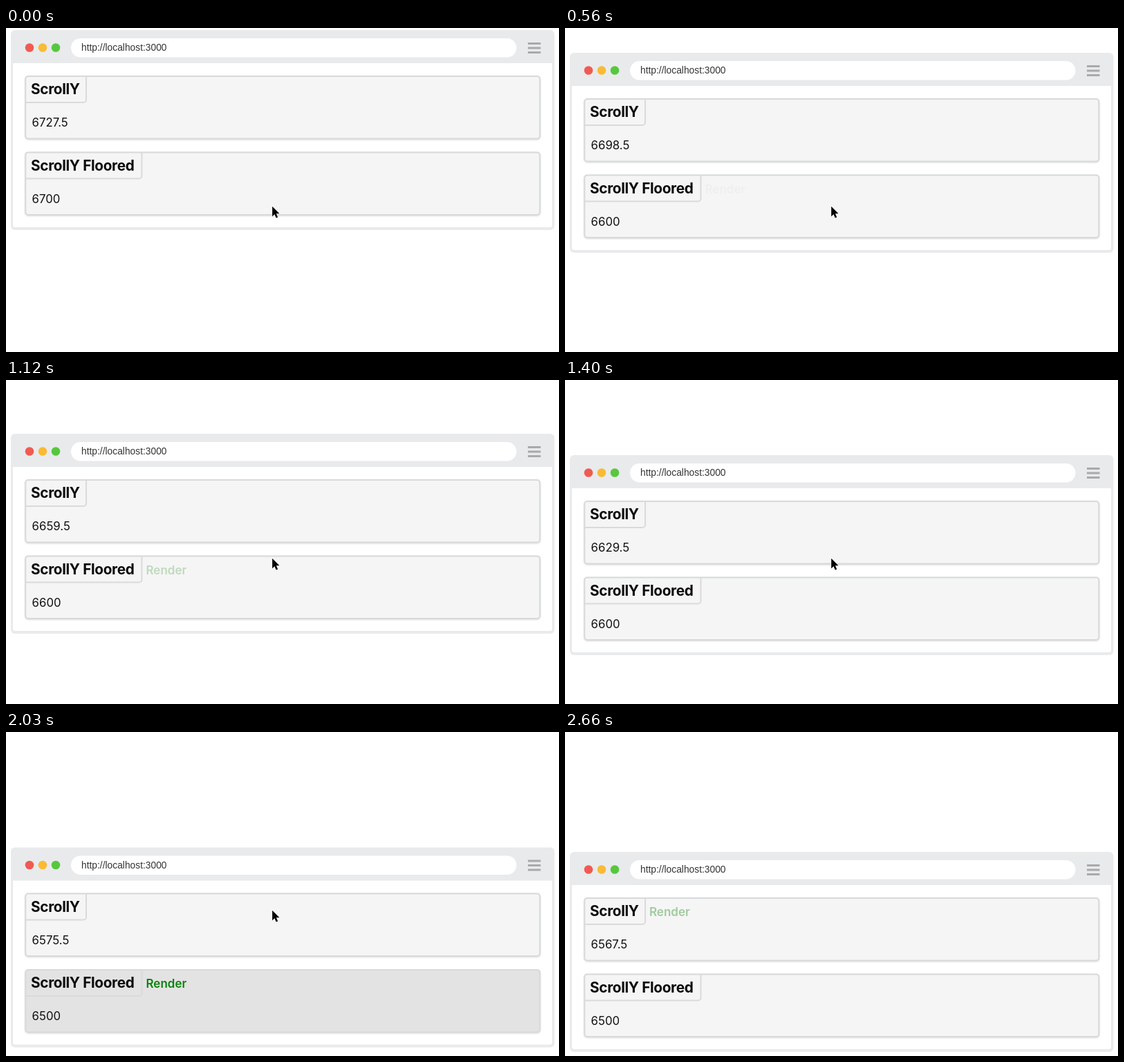
Recreate the animation shown at these times as an HTML page. Size 800x470 px, loop 2730 ms.

```html
<!DOCTYPE html>
<html lang="en">
<head>
<meta charset="utf-8">
<title>ScrollY</title>
<style>
  html, body { margin: 0; width: 100%; height: 100%; overflow: hidden; background: #fff; }
  svg { display: block; width: 800px; height: 470px; }
  text { font-family: Inter, "Open Sans", sans-serif; fill: #111; }
  .url { font: 13.8px "Liberation Sans", Arial, sans-serif; fill: #333; }
  .title { font-size: 20.8px; font-weight: 700; letter-spacing: -.35px; fill: #0a0a0a; }
  .value { font-size: 16.8px; }
  .render { font-size: 17px; font-weight: 600; fill: #0b800b; }
  .box { stroke: #d8d9da; stroke-width: 2; filter: drop-shadow(0 1.5px 1.2px rgba(0, 0, 0, .14)); }
  .tab { fill: none; stroke: #d9dadb; stroke-width: 2; }
</style>
</head>
<body>
<svg viewBox="0 0 800 470">
  <g id="window">
    <rect x="7" y="3" width="786.5" height="290" rx="6" fill="#e9eaec"/>
    <path d="M10 51H790V286a3 3 0 0 1-3 3H13a3 3 0 0 1-3-3Z" fill="#fff"/>
    <circle cx="34" cy="28.5" r="6.3" fill="#f05b51"/>
    <circle cx="53" cy="28.5" r="6.3" fill="#f9bb35"/>
    <circle cx="72" cy="28.5" r="6.3" fill="#56c83d"/>
    <rect x="94" y="15" width="644.5" height="27.5" rx="13.75" fill="#fff"/>
    <text class="url" x="109" y="33.2">http://localhost:3000</text>
    <path d="M755 22.5h18.5M755 29h18.5M755 35.5h18.5" stroke="#a8a9ab" stroke-width="2.8"/>
    <g id="cards"></g>
  </g>
  <path id="cursor" d="M385.2 258.8v14.6l3.3-3.1 2.3 5.2 2.5-1.1-2.3-5.1h4.6Z"
        fill="#000" stroke="#fff" stroke-width="1.2" paint-order="stroke"/>
</svg>
<script>
const LOOP = 2730, STEP = 70, START = 6727.5;
const $ = id => document.getElementById(id);

// Smooth monotone curve through [time, value] points, flat outside them.
function curve(points) {
  const last = points.length - 1;
  const slope = i => (points[i + 1][1] - points[i][1]) / (points[i + 1][0] - points[i][0]);
  const tangent = points.map((p, i) => {
    if (i === 0 || i === last) return 0;
    const a = slope(i - 1), b = slope(i);
    return a * b > 0 ? 2 * a * b / (a + b) : 0;
  });
  return t => {
    if (t <= points[0][0]) return points[0][1];
    if (t >= points[last][0]) return points[last][1];
    const i = points.findIndex(p => p[0] > t) - 1;
    const [t0, y0] = points[i], [t1, y1] = points[i + 1];
    const d = t1 - t0, u = (t - t0) / d, v = 1 - u;
    return v * v * (1 + 2 * u) * y0 + u * u * (1 + 2 * v) * y1
      + d * u * v * (v * tangent[i] - u * tangent[i + 1]);
  };
}

const shift = curve([[140, 0], [210, 1.5], [560, 33], [700, 49], [1120, 75], [1260, 91],
  [1400, 106], [1750, 141], [1820, 146], [2030, 164.5], [2170, 171]]);
const scrolled = curve([[140, 0], [210, 1], [560, 29], [700, 44], [1120, 68], [1260, 83],
  [1400, 98], [1750, 130], [1820, 135], [2030, 152], [2170, 160]]);
const labelFade = curve([[0, .03], [280, 1], [490, .36], [560, .23], [700, 0]]);
const boxFade = curve([[0, 0], [280, 1], [490, 0]]);

function addCard(title, y, tabRight, flashes) {
  const g = document.createElementNS("http://www.w3.org/2000/svg", "g");
  g.setAttribute("transform", `translate(0 ${y})`);
  g.innerHTML = `
    <rect class="box" x="28.3" y="1" width="744" height="90.5" rx="4"/>
    <path class="tab" d="M29 39H${tabRight - 4}a4 4 0 0 0 4-4V1"/>
    <text class="title" x="36" y="27.4">${title}</text>
    <text class="render" x="${tabRight + 6}" y="27.3">Render</text>
    <text class="value" x="37.6" y="74.3"></text>`;
  $("cards").append(g);
  const [box, label, value] = ["box", "render", "value"].map(c => g.querySelector("." + c));
  return (t, text) => {
    const start = flashes.filter(f => f <= t).pop();
    const age = start === undefined ? Infinity : t - start;
    const gray = 244.5 - 17.5 * boxFade(age);
    box.style.fill = `rgb(${gray}, ${gray}, ${gray})`;
    label.style.opacity = labelFade(age);
    value.textContent = text;
  };
}

const drawExact = addCard("ScrollY", 69, 116, [2170]);
const drawFloored = addCard("ScrollY Floored", 179.4, 196.5, [560, 1750]);

function draw(now) {
  const t = Math.floor(now % LOOP / STEP) * STEP;
  const y = START - Math.round(scrolled(t));
  $("window").setAttribute("transform", `translate(0 ${shift(t)})`);
  drawExact(t, y.toFixed(1));
  drawFloored(t, Math.floor(y / 100) * 100);
  $("cursor").style.display = t < 2450 ? "" : "none";
}

const begin = performance.now();
function tick() {
  draw(performance.now() - begin);
  requestAnimationFrame(tick);
}
tick();
</script>
</body>
</html>
```
